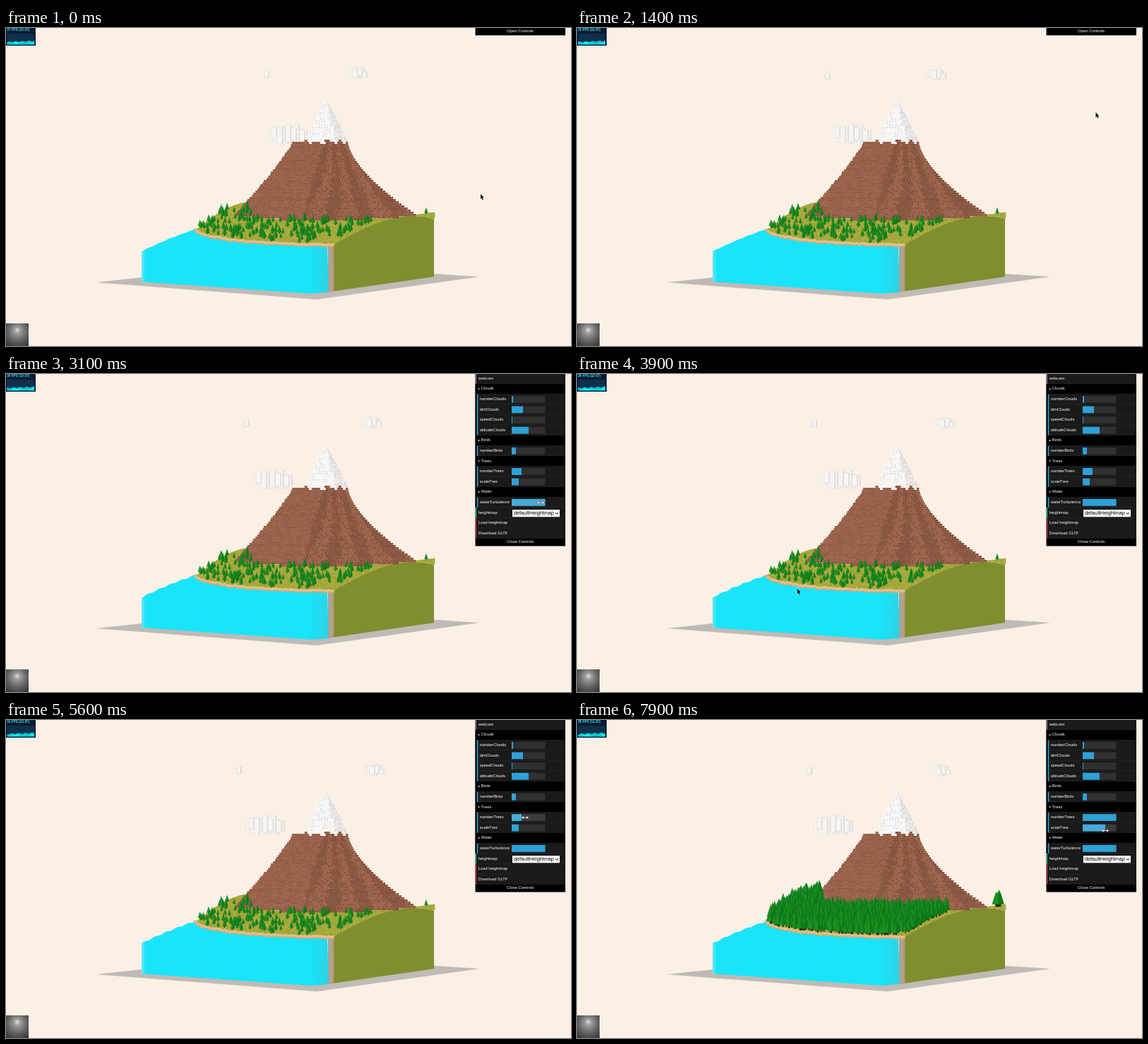
An HTML page with a canvas that plays this animation: 800 px wide and 450 px high, repeating every 8 s.

```html
<!DOCTYPE html>
<html>
<head>
<meta charset="utf-8">
<style>
  html, body { margin: 0; height: 100%; overflow: hidden; background: #faf0e6; }
  canvas { display: block; width: 100vw; height: 100vh; }
</style>
</head>
<body>
<canvas id="stage" width="800" height="450"></canvas>
<script>
const LOOP = 8000, OPEN_AT = 1700;
const FONT = '"Liberation Sans", Arial, sans-serif';
const stage = document.getElementById('stage').getContext('2d');

function seeded(seed) {
  return () => (seed = (seed * 16807) % 2147483647) / 2147483647;
}

const lerp = (a, b, k) => a + (b - a) * k;
const ramp = (t, from, to) => Math.min(1, Math.max(0, (t - from) / (to - from)));
const shape = points => new Path2D('M' + points + 'Z');

function box(c, color, x, y, w, h) {
  c.fillStyle = color;
  c.fillRect(x, y, w, h);
}

// ---- Island outline ----
const WEST = 267, CORNER = 464, EAST = 606;
const mountainFoot = x => 272 - 8 * ((x - 450) / 130) ** 2;

// Front rim: an elliptic shore, then the crest of the cut side
function frontRim(x) {
  if (x < CORNER) return 286 + 22 * Math.sqrt(1 - ((CORNER - x) / (CORNER - WEST)) ** 2);
  return 306 - 40 * Math.sin((x - CORNER) / 71);
}

function backRim(x) {
  return x < 347 ? 286 - 40 * Math.sin((x - WEST) / 51) : mountainFoot(x);
}

function slopes(y) {
  if (y < 159) return [451 - (y - 104) * .5, 456 + (y - 104) * .51];
  const k = ramp(y, 159, 262);
  return [407 - 82 * k ** 1.17, 484 + 96 * k ** 1.6];
}

function paintMountain(c, rnd) {
  for (let y = 104; y < 273; y += 3) {
    const [left, right] = slopes(y);
    for (let x = left - rnd() * 2; x < right; x += 4) {
      if (y > mountainFoot(x) - 1) continue;
      const u = (x - 452) / (x < 452 ? 452 - left : right - 452);
      const snow = x > 420 && y < 160 + 3 * Math.sin(Math.floor(x / 6) * 2.4);
      const dark = u > -.25 && Math.sin(u * 17 + y * .05) + rnd() > .6;
      let front, side;
      if (snow) {
        front = u > .4 ? '#ebe9e8' : '#f8f7f6';
        side = u > .3 ? '#d0cecd' : '#dfdddc';
      } else {
        front = dark ? '#8b5742' : '#9b634c';
        side = u > -.2 ? '#7d4d3a' : '#895642';
      }
      const w = Math.min(4.3, right - x);
      box(c, front, x, y, w, 3.3);
      if (rnd() > .5) continue;
      if (snow || u > -.2) box(c, side, x + w / 2, y, w / 2, 2);
      else box(c, side, x, y + 2, w, 1);
    }
  }
}

function paintIsland() {
  const canvas = document.createElement('canvas');
  canvas.width = 800;
  canvas.height = 450;
  const c = canvas.getContext('2d'), rnd = seeded(77);

  c.fillStyle = '#808e2f';
  c.beginPath();
  c.moveTo(CORNER, 372.5);
  for (let x = CORNER; x <= EAST; x += 2) c.lineTo(x, frontRim(x));
  c.lineTo(EAST, 352);
  c.fill();

  const sand = c.createLinearGradient(456, 0, 465, 0);
  sand.addColorStop(0, '#8fa9a6');
  sand.addColorStop(.5, '#b6a38e');
  sand.addColorStop(1, '#b5916c');
  c.fillStyle = sand;
  c.fill(shape('456 307 464.5 305 464.5 372.5 456 374'));

  for (let x = WEST; x < EAST; x += 2) {
    const back = backRim(x), front = frontRim(x);
    box(c, '#a6aa3c', x, back, 2.3, front - back);
    for (let y = back; y < front - 1; y += 2)
      if (rnd() < .4) box(c, rnd() < .6 ? '#8f9b31' : '#b4b447', x, y, 2.3, 1);
  }
  for (let x = WEST - 1; x < CORNER - 1; x += 3) {
    const y = frontRim(Math.max(x, WEST)) + rnd() * 1.6;
    box(c, '#e3c08c', x, y - 4, 3.3, 4.5);
    box(c, '#cba475', x + 1, y - 1, 2.3, 2);
  }
  paintMountain(c, rnd);
  return canvas;
}

// ---- Trees ----
function plantTrees() {
  const rnd = seeded(4242), list = [];
  while (list.length < 1110) {
    const x = lerp(WEST + 3, EAST - 3, rnd()), y = lerp(245, 308, rnd());
    if (y > backRim(x) + 1 && y < frontRim(x) - 3)
      list.push({ x, y, size: lerp(.75, 1.15, rnd()), rank: list.length });
  }
  return list.sort((a, b) => a.y - b.y);
}

function drawTree({ x, y, size }, scale) {
  const s = size * scale, foot = y - 1.5 * s;
  box(stage, '#1e2a10', x - .5 * s, foot, s, 1.7 * s);
  for (const [side, color] of [[-1, '#1a9023'], [1, '#0f7819']]) {
    stage.fillStyle = color;
    stage.beginPath();
    stage.moveTo(x, y - 10.5 * s);
    stage.lineTo(x + side * 2.8 * s, foot);
    stage.lineTo(x, foot + .5);
    stage.fill();
  }
}

// ---- Ground and water ----
function drawGround() {
  const [l, f, r, b] = [[129, 360], [440, 384], [669, 352], [377, 333]];
  stage.fillStyle = '#d8d2cb';
  stage.fill(shape([l, f, r, b].join(' ')));
  stage.strokeStyle = 'rgba(105,105,105,.17)';
  stage.lineWidth = .6;
  stage.beginPath();
  const mix = (p, q, k) => [lerp(p[0], q[0], k), lerp(p[1], q[1], k)];
  const line = (p, q) => { stage.moveTo(...p); stage.lineTo(...q); };
  for (let k = 0; k <= 1; k += 1 / 64) {
    line(mix(l, f, k), mix(b, r, k));
    line(mix(l, b, k), mix(f, r, k));
  }
  stage.stroke();
}

function drawWater(t, turbulence) {
  const fill = stage.createLinearGradient(191, 0, 458, 0);
  fill.addColorStop(0, '#7ce8f3');
  fill.addColorStop(.025, '#19e4fa');
  fill.addColorStop(.89, '#19e4fa');
  fill.addColorStop(1, '#2fd2e2');
  stage.fillStyle = fill;
  stage.beginPath();
  stage.moveTo(192, 359);
  for (let x = 192; x < WEST; x += 3) {
    const ripple = Math.sin(x * .4 + t * .006) * (.3 + turbulence * .5);
    stage.lineTo(x, lerp(316, 285, (x - 192) / 75) - 1.5 * Math.sin((x - 192) / 24) + ripple);
  }
  for (let x = WEST; x < 457; x += 4) stage.lineTo(x, frontRim(x) - 2);
  stage.lineTo(457, 374);
  stage.lineTo(432, 376);
  stage.fill();
}

// ---- Clouds ----
// Each drifts towards (x, y) from an offset (dx, dy), turning at time `turn`.
const CLOUDS = [
  { x: 333, y: 71, dx: 41, dy: -6, turn: 7000, width: 19, height: 15, count: 5 },
  { x: 522, y: 71, dx: -24, dy: -8, turn: 5200, width: 31, height: 18, count: 7 },
  { x: 363, y: 149, dx: 37, dy: 2, turn: 8500, width: 60, height: 31, count: 13 }
];

function drawCloud({ x, y, dx, dy, turn, width, height, count }, t) {
  const rnd = seeded(count * 991);
  const cx = x + dx * (1 - t / turn) ** 2, cy = y + dy * (1 - t / 7500) ** 2;
  for (let i = 0; i < count; i++) {
    const k = (i * 5 % count + .5) / count * 2 - 1;
    const h = height * (1 - .5 * k * k) * lerp(.55, 1, rnd());
    const w = width / count * 1.9;
    const left = cx + k * (width - w) / 2 - w / 2;
    const top = cy - h / 2 + (rnd() - .5) * (height - h) * .6;
    box(stage, 'rgba(222,219,216,.85)', left, top, w, h);
    box(stage, 'rgba(249,247,245,.95)', left + .6, top + .6, w * .68, h - 1.2);
  }
}

// ---- Overlays ----
function text(str, x, y, color, size, weight = '', align = 'left') {
  stage.font = `${weight} ${size}px ${FONT}`;
  stage.textAlign = align;
  stage.textBaseline = 'middle';
  stage.fillStyle = color;
  stage.fillText(str, x, y);
}

function drawStats(t) {
  const second = Math.floor(t / 1000);
  const fps = [37, 33, 28, 30, 30, 31, 29, 28][second];
  box(stage, '#0b1a33', 0, 0, 42, 25);
  box(stage, '#10304a', 1.5, 8, 38.5, 15.5);
  text(`${fps} FPS (${t < 5000 ? 12 : 13}-37)`, 1.2, 3.2, '#3fe9f2', 4.7, 'bold');
  for (let i = 0; i < 37; i++) {
    const n = i + second;
    const h = 3.6 + Math.sin(n * .7) * .7 + Math.sin(n * 2.3) * .6 + i / 26;
    box(stage, '#0cf0f8', 1.5 + i * 1.04, 23.5 - h, 1.1, h);
  }
}

function drawThumbnail() {
  const g = stage.createRadialGradient(16, 427, 0, 16, 431, 23);
  g.addColorStop(0, '#e0e0e0');
  g.addColorStop(.2, '#9c9c9c');
  g.addColorStop(.55, '#696969');
  g.addColorStop(1, '#363636');
  box(stage, g, 0, 418, 32, 32);
}

const ROW = 14.59, SLIDER_X = 716, SLIDER_W = 47.5;
const ROWS = [
  'webcam', '-Clouds', ['numberClouds', 2], ['dimClouds', 16], ['speedClouds', 1], ['altitudeClouds', 24],
  '-Birds', ['numberBirds', 6], '-Trees', ['numberTrees', 14], ['scaleTree', 10],
  '-Water', ['waterTurbulence', 7], 'heightmap', 'Load heightmap', 'Download GLTF'
];
const EDGE = { webcam: '#806787', heightmap: '#1fb58a', 'Load heightmap': '#b8324a', 'Download GLTF': '#b8324a' };

function drawPanel(values, hover) {
  box(stage, '#1a1a1a', 664.5, 0, 127.5, 233);
  ROWS.forEach((row, i) => {
    const y = 6.6 + ROW * i, top = y - ROW / 2;
    if (Array.isArray(row)) {
      const [name, initial] = row, on = i === hover;
      box(stage, '#000', 664.5, top, 2.2, ROW);
      box(stage, '#2fa1d6', 666.7, top, 1.6, ROW);
      text(name, 670.7, y - .3, '#fff', 5.75);
      box(stage, on ? '#3c3c3c' : '#303030', SLIDER_X, y - 4.8, SLIDER_W, 9.8);
      box(stage, on ? '#48abdb' : '#2fa1d6', SLIDER_X, y - 4.8, Math.min(SLIDER_W, values[name] ?? initial), 9.8);
    } else if (row[0] === '-') {
      box(stage, '#000', 664.5, top, 127.5, ROW);
      stage.fillStyle = '#fff';
      stage.fill(shape([668, y - .8, 671, y - .8, 669.5, y + 1]));
      text(row.slice(1), 672.8, y - .3, '#fff', 5.75);
    } else {
      box(stage, EDGE[row], 664.5, top, 1.6, ROW);
      text(row, 668.8, y - .3, '#fff', 5.75);
    }
    box(stage, '#2c2c2c', 668.3, top + ROW - .5, 123.7, .5);
  });
  box(stage, '#fff', 717, 192, 67, 10.2);
  text('defaultHeightmap', 719, 197.2, '#000', 7.25);
  stage.strokeStyle = '#000';
  stage.lineWidth = 1;
  stage.stroke(new Path2D('M778 196L780 198.3L782 196'));
  drawToggle('Close Controls', 232.7);
}

function drawToggle(label, y) {
  box(stage, '#000', 664.5, y, 127.5, 10.8);
  text(label, 728.2, y + 5, '#fff', 5.85, '', 'center');
}

// [time, x, y]
const POINTER = [
  [0, 672, 235], [1400, 734.5, 119.5], [1650, 728, 6], [2300, 720, 156.5],
  [2500, 722, 182], [3200, 763, 182], [3900, 312, 304], [5600, 735, 138],
  [6200, 763, 138], [6900, 740.5, 167], [7300, 726, 154], [7900, 748, 156.5]
];

function pointerAt(t) {
  const i = Math.max(1, POINTER.findIndex(p => p[0] >= t));
  const [t0, x0, y0] = POINTER[i - 1], [t1, x1, y1] = POINTER[i];
  const k = ramp(t, t0, t1);
  return [lerp(x0, x1, k), lerp(y0, y1, k)];
}

const CURSORS = {
  arrow: ['#000', '#eee', shape('0 0 0 7 1.6 5.6 2.8 8.3 4 7.8 2.8 5.1 4.8 5')],
  hand: ['#fff', '#000', shape('-1 -1 .2 -1 .4 2 3.6 3 3.4 6 2.6 8 -.8 8 -2.6 4.2 -1.8 3.7 -1 4.8')],
  resize: ['#fff', '#000', shape('-5 0 -2.4 -2.2 -2.4 -.6 2.4 -.6 2.4 -2.2 5 0 2.4 2.2 2.4 .6 -2.4 .6 -2.4 2.2')]
};

function drawPointer(x, y, kind) {
  const [fill, edge, path] = CURSORS[kind];
  stage.save();
  stage.translate(x, y);
  stage.lineWidth = .7;
  stage.strokeStyle = edge;
  stage.fillStyle = fill;
  stage.stroke(path);
  stage.fill(path);
  stage.restore();
}

// ---- Scene ----
const island = paintIsland();
const trees = plantTrees();

function draw(t) {
  const turbulence = ramp(t, 2500, 3100);
  const growth = ramp(t, 7300, 7900);
  const values = {
    waterTurbulence: lerp(7, 48, turbulence),
    numberTrees: lerp(14, 48, ramp(t, 5600, 6200)),
    scaleTree: lerp(10, 32, growth)
  };
  box(stage, '#faf0e6', 0, 0, 800, 450);
  drawGround();
  drawWater(t, turbulence);
  CLOUDS.forEach(cloud => drawCloud(cloud, t));
  stage.drawImage(island, 0, 0);

  const count = 4.9 * values.numberTrees ** 1.4;
  for (const tree of trees) if (tree.rank < count) drawTree(tree, 1 + growth);

  drawStats(t);
  drawThumbnail();

  const [x, y] = pointerAt(t), row = Math.floor((y + .7) / ROW);
  const open = t >= OPEN_AT;
  const onSlider = open && x >= SLIDER_X && x <= 764 && Array.isArray(ROWS[row]);
  if (open) drawPanel(values, onSlider ? row : -1);
  else drawToggle('Open Controls', -.4);
  const onPanel = x > 664 && y < (open ? 244 : 10);
  drawPointer(x, y, onSlider ? 'resize' : onPanel ? 'hand' : 'arrow');
}

const began = performance.now();
function tick() {
  const t = (performance.now() - began) % LOOP;
  draw(Math.floor(t / 100) * 100);
  requestAnimationFrame(tick);
}
tick();
</script>
</body>
</html>
```
